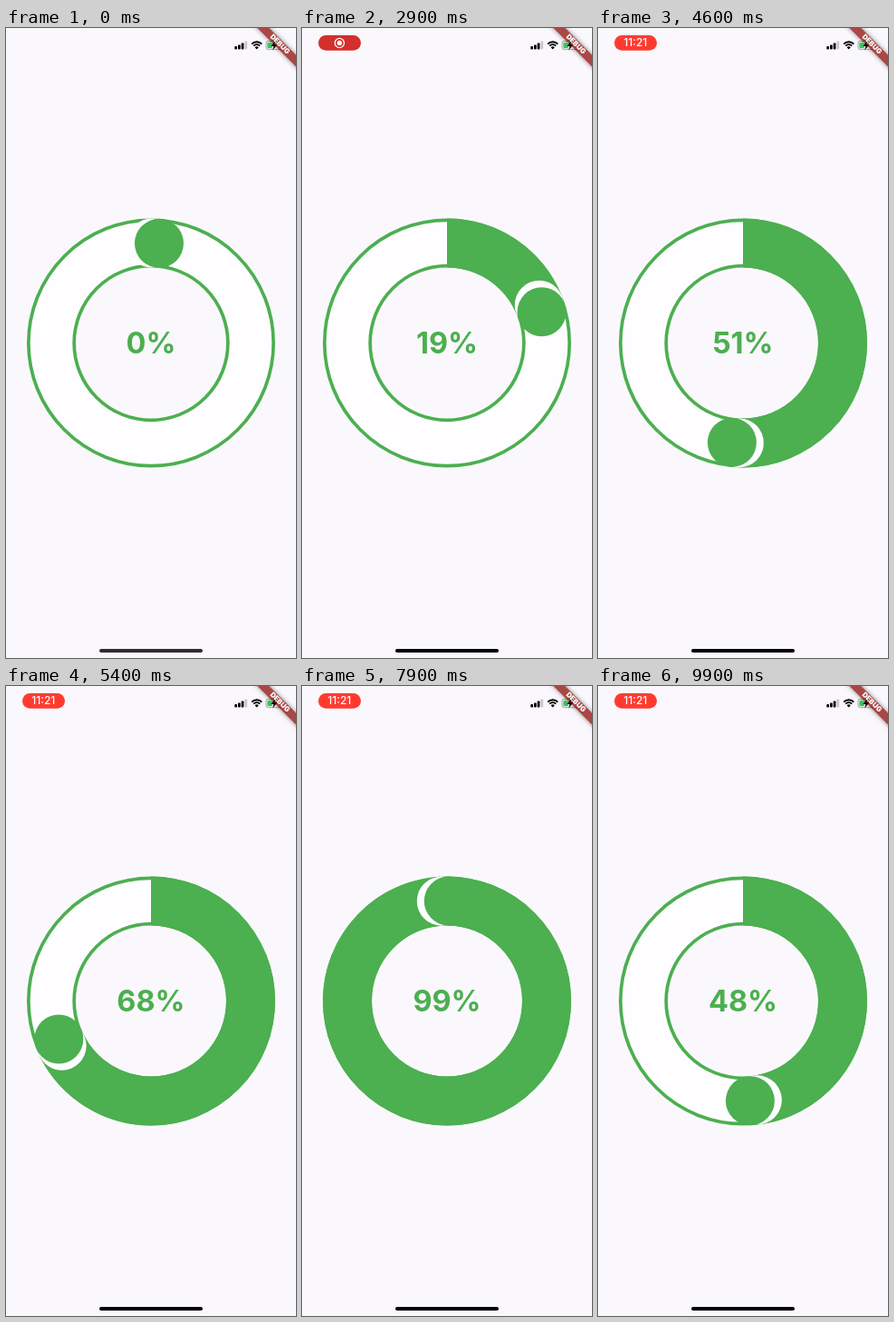
Recreate the animation shown at these times as an HTML page with a canvas. Size 320 by 693 pixels, loop 10000 ms.

```html
<!DOCTYPE html>
<html lang="en">
<head>
<meta charset="utf-8">
<title>Circular progress slider</title>
<style>
  html, body { margin: 0; width: 100%; height: 100%; overflow: hidden; background: #faf8fc; }
  canvas { position: absolute; left: 0; top: 0; width: 320px; height: 693px; }
  .label {
    position: absolute; transform: translate(-50%, -50%);
    font-family: Inter, Roboto, sans-serif; line-height: 1; white-space: nowrap;
  }
  #percent { left: 160px; top: 346.5px; font-size: 32.5px; font-weight: 700; color: #4caf50; }
  #clock { left: 41.3px; top: 16.4px; font-size: 12px; font-weight: 500; color: #fff; }
  #debug {
    left: 302px; top: 18px; font-size: 7.8px; font-weight: 900; color: #fff;
    transform: translate(-50%, -50%) rotate(45deg);
  }
</style>
</head>
<body>
<canvas id="stage"></canvas>
<div class="label" id="percent">0%</div>
<div class="label" id="clock">11:21</div>
<div class="label" id="debug">DEBUG</div>
<script>
const W = 320, H = 693, LOOP = 10000, STEP = 100;
const TAU = Math.PI * 2;
const GREEN = '#4caf50', PAPER = '#faf8fc', TRACK = '#fefdff';
const CX = 160, CY = 346.5, OUTER = 137, INNER = 83, LINE = 3.7;
const MID = (OUTER + INNER) / 2, BAND = OUTER - INNER;
const LEAD = 8 / MID; // the knob runs slightly ahead of its white rim
const CLOCK_AT = 3800;

// [ms, percent]
const PROGRESS = [
  [0, 0.14], [1800, 0.14], [2900, 18.8], [4600, 50.6], [5500, 70],
  [6200, 89.4], [6800, 98.4], [7900, 99.1], [8800, 75], [9900, 47.7], [10000, 46.5]
];
// [ms, brightness of the recording pill]
const PULSE = [[0, 1], [700, 1], [1400, 0.41], [2300, 0], [2900, 0], [3800, 1], [10000, 1]];

const canvas = document.getElementById('stage');
const ctx = canvas.getContext('2d');
const percent = document.getElementById('percent');
const clock = document.getElementById('clock');
const ratio = window.devicePixelRatio || 1;
canvas.width = Math.round(W * ratio);
canvas.height = Math.round(H * ratio);

const clamp = x => Math.max(0, Math.min(1, x));
const mix = (a, b, k) => a + (b - a) * k;

// Monotone cubic through the keys
function sample(keys, t) {
  const slope = i => (keys[i + 1][1] - keys[i][1]) / (keys[i + 1][0] - keys[i][0]);
  const tangent = i => {
    if (i === 0) return slope(0);
    if (i === keys.length - 1) return slope(i - 1);
    const a = slope(i - 1), b = slope(i);
    return a * b <= 0 ? 0 : 2 * a * b / (a + b);
  };
  let i = 0;
  while (i < keys.length - 2 && t >= keys[i + 1][0]) i++;
  const [t0, v0] = keys[i], [t1, v1] = keys[i + 1];
  const h = t1 - t0, k = (t - t0) / h, k2 = k * k, k3 = k2 * k;
  return v0 * (2 * k3 - 3 * k2 + 1) + h * tangent(i) * (k3 - 2 * k2 + k)
       + v1 * (3 * k2 - 2 * k3) + h * tangent(i + 1) * (k3 - k2);
}

function disc(x, y, r, color) {
  ctx.fillStyle = color;
  ctx.beginPath();
  ctx.arc(x, y, r, 0, TAU);
  ctx.fill();
}

function arc(x, y, r, width, color, from = 0, to = TAU) {
  ctx.strokeStyle = color;
  ctx.lineWidth = width;
  ctx.beginPath();
  ctx.arc(x, y, r, from, to);
  ctx.stroke();
}

function box(x, y, w, h, r, color) {
  ctx.fillStyle = color;
  ctx.beginPath();
  ctx.roundRect(x, y, w, h, r);
  ctx.fill();
}

function poly(points, color) {
  ctx.fillStyle = color;
  ctx.beginPath();
  points.forEach(([x, y]) => ctx.lineTo(x, y));
  ctx.fill();
}

function drawSlider(p) {
  const angle = p / 100 * TAU;
  const onRing = a => [CX + MID * Math.sin(a), CY - MID * Math.cos(a)];
  arc(CX, CY, MID, BAND, TRACK);
  arc(CX, CY, OUTER - LINE / 2, LINE, GREEN);
  arc(CX, CY, INNER + LINE / 2, LINE, GREEN);
  arc(CX, CY, MID, BAND, GREEN, -TAU / 4, angle - TAU / 4);
  disc(...onRing(angle), BAND / 2, TRACK);
  disc(...onRing(angle + LEAD), BAND / 2, GREEN);
}

function drawBanner() {
  ctx.save();
  ctx.translate(W, 0);
  ctx.rotate(TAU / 8);
  ctx.shadowColor = 'rgba(0,0,0,0.5)';
  ctx.shadowBlur = 5 * ratio;
  box(-40, 21, 80, 9, 0, '#a94744');
  ctx.restore();
}

function drawStatus() {
  [3.6, 5, 7, 9].forEach((h, i) =>
    box(252.3 + i * 3.7, 23.5 - h, 2.7, h, 0.8, i < 3 ? '#000' : '#c8c6ca'));

  const from = -TAU * 3 / 8, to = -TAU / 8;
  arc(276.7, 23.2, 7.9, 1.9, '#000', from, to);
  arc(276.7, 23.2, 5, 1.8, '#000', from, to);
  ctx.fillStyle = '#000';
  ctx.beginPath();
  ctx.moveTo(276.7, 23.4);
  ctx.arc(276.7, 23.4, 3, from, to);
  ctx.fill();

  ctx.strokeStyle = 'rgba(0,0,0,0.38)';
  ctx.lineWidth = 0.9;
  ctx.beginPath();
  ctx.roundRect(286.9, 14.5, 17.4, 9.2, 2.6);
  ctx.stroke();
  box(305.2, 17.6, 1.1, 3, 0.5, 'rgba(0,0,0,0.38)');
  box(288.3, 15.9, 5.4, 6.4, [1.5, 0, 0, 1.5], '#35c759');
  poly([[297.3, 13.8], [292.4, 19.9], [295.4, 19.9], [294.2, 24.4], [299.2, 18.2], [296.1, 18.2]], '#000');
}

function drawPill(t) {
  const k = clamp(sample(PULSE, t));
  ctx.globalAlpha = clamp((t - 200) / 500);
  box(18, 8, 47, 16.8, 8.4,
    `rgb(${mix(211, 255, k)},${mix(47, 59, k)},${mix(44, 48, k)})`);
  if (t < CLOCK_AT) {
    arc(41.4, 16.5, 5.1, 1.3, '#fff');
    disc(41.4, 16.5, 2.7, '#fff');
  }
  ctx.globalAlpha = 1;
}

function draw(t) {
  const p = sample(PROGRESS, t);
  ctx.setTransform(ratio, 0, 0, ratio, 0, 0);
  ctx.fillStyle = PAPER;
  ctx.fillRect(0, 0, W, H);
  drawSlider(p);
  drawBanner();
  drawStatus();
  drawPill(t);
  const shade = Math.round(46 * (1 - clamp(t / 700)));
  box(103, 683, 114, 4, 2, `rgb(${shade},${shade},${shade})`);
  percent.textContent = Math.round(p) + '%';
  clock.style.visibility = t < CLOCK_AT ? 'hidden' : 'visible';
}

const start = performance.now();
function tick() {
  const t = (performance.now() - start) % LOOP;
  draw(Math.floor(t / STEP) * STEP);
  requestAnimationFrame(tick);
}
tick();
</script>
</body>
</html>
```
